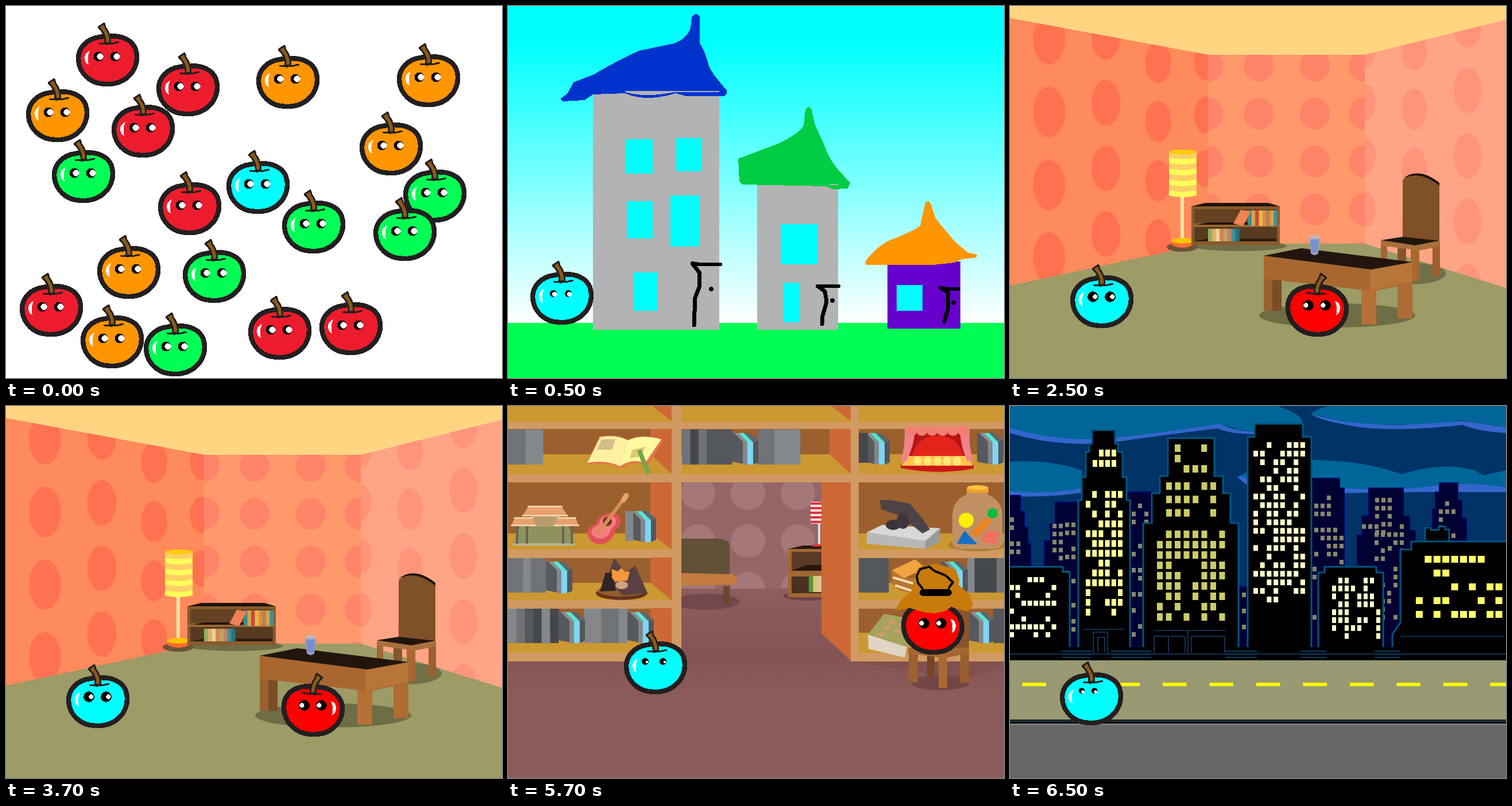
An HTML page that plays this animation: 864x648 px, repeating every 8 s.

```html
<!DOCTYPE html>
<html lang="en">
<head>
<meta charset="utf-8">
<title>Apples</title>
<style>
html, body { margin: 0; width: 100%; height: 100%; overflow: hidden; background: #fff; }
svg { display: block; width: 100%; height: 100%; }
</style>
</head>
<body>
<svg id="stage" viewBox="0 0 864 648"></svg>
<script>
const path = (d, fill, stroke = 'none', w = 0) =>
  `<path d="${d}" fill="${fill}" stroke="${stroke}" stroke-width="${w}" stroke-linejoin="round" stroke-linecap="round"/>`;
const line = (d, color, w) => path(d, 'none', color, w);
const poly = (pts, fill) => `<polygon points="${pts}" fill="${fill}"/>`;
const rect = (x, y, w, h, fill) => `<rect x="${x}" y="${y}" width="${w}" height="${h}" fill="${fill}"/>`;
const oval = (x, y, rx, ry, fill) => `<ellipse cx="${x}" cy="${y}" rx="${rx}" ry="${ry}" fill="${fill}"/>`;
const each = (list, f) => list.map(f).join('');
const times = (n, f) => each([...Array(n).keys()], f);
const strips = (x, y, w, h, colors) => each(colors, (c, i) => rect(x + i * w, y, w + .3, h, c));
const fade = (id, ...stops) => `<defs><linearGradient id="${id}" x2="0" y2="1">` +
  each(stops, ([at, c]) => `<stop offset="${at}" stop-color="${c}"/>`) + '</linearGradient></defs>';
function random(seed) {
  let s = seed * 7919;
  return () => (s = s * 16807 % 2147483647) / 2147483647;
}

const INK = '#231f20', CYAN = '#00ffff', GREEN = '#00ff55', ORANGE = '#ff9500', RED = '#ed1c2c';

// eyes, relative to the body centre
const WIDE = { l: -16, r: 13, y: -6, size: 8.5, dx: 3, dy: 0, white: 5.7 };
const LOOK = { l: -15.5, r: 14.5, y: -8.5, size: 9.3, dx: 4, dy: 0, white: 4.2 };
function apple(x, y, color, eyes = WIDE, flip = 1, stem = true) {
  const body = path('M-51 -4C-50 -22 -36 -37 -14 -40Q2 -43 18 -41C40 -37 51 -24 51 -5C51 14 40 30 22 38Q12 42 0 42Q-14 42 -24 38C-42 29 -51 14 -51 -4Z', color, INK, 8.5);
  const shine = path('M-31 -16Q-40 -13 -40 -3Q-39 6 -33 8Q-37 -4 -31 -16Z', '#fff');
  const twig = stem ? line('M-14 -29Q2 -26 19 -31', INK, 3) +
    path('M-16 -57L-6 -64L-4 -57Q5 -45 5 -30L-4 -30Q-3 -45 -16 -57Z', '#8b5a17', INK, 3) : '';
  const face = each([eyes.l, eyes.r], e => oval(e, eyes.y, eyes.size, eyes.size, '#000') +
    oval(e + eyes.dx * flip, eyes.y + eyes.dy, eyes.white, eyes.white, '#fff'));
  return `<g transform="translate(${x} ${y})" shape-rendering="crispEdges"><g transform="scale(${flip} 1)">${body}${shine}${twig}</g>${face}</g>`;
}

function crowd() {
  const groups = [
    [RED, [[177, 94], [317, 146], [239, 218], [320, 353], [79, 530], [477, 570], [601, 562]]],
    [ORANGE, [[90, 191], [491, 133], [736, 130], [671, 249], [214, 464], [185, 585]]],
    [GREEN, [[135, 297], [747, 331], [695, 398], [536, 385], [363, 471], [295, 599]]],
    [CYAN, [[439, 316]]]
  ];
  return rect(0, 0, 864, 648, '#fff') + each(groups, ([c, at]) => each(at, ([x, y]) => apple(x, y, c)));
}

function street() {
  const GREY = '#b3b3b3', BLUE = '#0033cc', LEAF = '#00cc44';
  const pane = (...box) => rect(...box, CYAN);
  const door = (top, side, x, y) => line(top, '#000', 6.5) + line(side, '#000', 7) + oval(x, y, 4, 4, '#000');
  return fade('sky', [.12, CYAN], [1, '#fff']) + '<g shape-rendering="crispEdges">' +
    rect(0, 0, 864, 553, 'url(#sky)') + rect(0, 552, 864, 96, GREEN) +
    rect(148, 146, 220, 418, GREY) + rect(434, 300, 141, 264, GREY) + rect(661, 445, 127, 117, '#6600cc') +
    pane(204, 232, 48, 60) + pane(293, 230, 45, 58) + pane(207, 340, 45, 65) + pane(283, 330, 50, 89) +
    pane(219, 464, 41, 67) + pane(475, 380, 65, 70) + pane(479, 482, 28, 69) + pane(677, 486, 45, 45) +
    path('M91 162L104 152L114 133L150 119Q190 95 228 78L290 65Q312 56 318 38L320 20Q327 9 334 19L334 65Q344 80 350 105Q354 116 381 147L381 153L376 157L310 157L292 152Q240 168 204 152L148 154L133 164L96 166Z', BLUE) +
    path('M204 148H368V150H308L290 150Q240 160 204 150Z', GREY) +
    path('M401 266L470 240Q508 222 515 208L518 181Q524 171 529 181L534 205L552 245Q560 268 575 285L596 308L592 318L565 319L555 314L408 311L403 306Z', LEAF) +
    line('M561 311H573', GREY, 2) +
    path('M622 446Q640 420 665 408Q705 393 718 383L727 343Q731 337 736 343L745 370Q765 395 780 412L802 430L817 433L816 438L790 441L778 447L740 451L624 451Z', ORANGE) +
    door('M321 448L332 450H370', 'M322 450L334 465L333 490L326 508L324 556', 354, 493) +
    door('M539 488H576', 'M541 489L552 497L555 515L548 540L547 554', 565, 513) +
    door('M753 491L766 493H785', 'M755 492L766 498L767 525L760 550', 776, 517) + '</g>' +
    apple(94, 509, CYAN, { l: -15, r: 11, y: -8, size: 6, dx: 2, dy: 1, white: 4 });
}

// wallpaper: each column starts at [x, y]; scale(x) gives its perspective
function dots(id, clip, color, rx, ry, step, scale, cols) {
  return `<clipPath id="${id}"><polygon points="${clip}"/></clipPath><g clip-path="url(#${id})">` +
    each(cols, ([x, y]) => {
      const s = scale(x);
      return times(5, i => oval(x, y + i * step * s, rx * s, ry * s, color));
    }) + '</g>';
}

function room() {
  const left = '0,21 345,85 345,413 0,487', back = '345,85 618,85 618,414 345,414', right = '618,85 864,24 864,491 618,414';
  return rect(0, 0, 864, 648, '#9d9b66') + rect(0, 0, 864, 90, '#ffd582') +
    poly(left, '#ff8a5b') + poly(back, '#ff996b') + poly(right, '#ffa485') +
    dots('wl', left, '#ff7251', 28, 44, 126.7, x => 1 - (x - 68) * .00098, [[68, 58], [167, 54], [258, 98], [341, 97]]) +
    dots('wb', back, '#ff8468', 26, 28, 83.5, () => 1, [346, 433, 531, 616].map(x => [x, 104])) +
    dots('wr', right, '#ff947b', 27, 44, 126.7, x => .735 + (x - 617) * .00092, [[617, 75], [704, 76], [797, 33]]) +
    oval(400, 418, 82, 9, '#6f6c47') + oval(300, 420, 27, 8, '#6f5437') +
    // lamp
    rect(297, 330, 6, 80, '#ffe6a0') + path('M281 409V416Q300 426 320 416V409Z', '#ff6a32') + oval(300.5, 409, 19.5, 5, '#ffc400') +
    path('M277 254V329Q301 337 325 329V254Z', '#ffcf63') +
    times(4, i => path(`M277 ${264 + i * 19}q24 6 48 0v9q-24 6 -48 0Z`, '#ffff58')) + oval(301, 254, 24, 4, '#ffcb00') +
    // bookcase
    rect(316, 349, 154, 67, '#8a5a2b') + rect(321, 354, 144, 24, '#654221') + rect(321, 383, 144, 27, '#573b20') +
    poly('316,349 340,343 450,343 470,349', '#1e140d') + poly('321,382 345,377 464,377 464,382', '#21150b') +
    poly('321,410 345,405 464,405 464,410', '#2b1c0e') + rect(316, 381, 154, 4, '#9a6632') +
    strips(414, 356, 6.5, 27, ['#398c88', '#d4a252', '#c94934', '#e4bb42', '#da8b4c', '#bd814b', '#d5a34b', '#438d94']) +
    poly('389,379 402,355 420,358 406,383', '#ee8255') +
    strips(345, 388, 6.8, 22, ['#8fae60', '#dfb067', '#f0d0a0', '#d38850', '#c6a067', '#b9856b', '#438f94', '#23747c']) +
    // chair
    oval(700, 466, 59, 19, '#727047') +
    path('M684 303Q712 279 748 310V410H684Z', '#805028') + path('M684 301Q711 279 748 308V313Q714 285 684 301Z', '#1d120b') +
    rect(646, 412, 11, 60, '#a26632') + rect(675, 418, 15, 35, '#85562b') + rect(698, 418, 15, 61, '#a8682f') + rect(736, 411, 13, 60, '#9c602d') +
    poly('646,408 706,417 748,409 748,419 712,426 646,417', '#a9713a') + poly('646,408 684,402 748,409 706,417', '#21160d') +
    // table
    oval(570, 539, 136, 21, '#6e6d45') +
    rect(442, 468, 15, 62, '#9a602d') + rect(457, 472, 16, 59, '#7c4c24') + rect(675, 475, 26, 69, '#ad6c33') + rect(612, 485, 26, 70, '#b57035') +
    poly('442,435 632,459 701,446 701,482 634,497 442,475', '#a9672f') + poly('627,459 701,446 701,480 627,497', '#b77538') +
    poly('442,435 507,422 701,446 629,459', '#21150d') +
    path('M521 402L524 431Q531 437 537 431L540 402Z', '#a7a6b9') + path('M523 407L525 429Q531 433 536 429L538 407Z', '#7590d1') + oval(530.5, 402, 9.5, 3, '#c6b8bc') +
    apple(160, 515, CYAN, LOOK) + apple(535, 530, '#ff0000', LOOK, -1);
}

function books(x, y, w, h) {
  const next = random(x + y + 3);
  const greys = ['#85888a', '#54575b', '#707376', '#44474c'];
  return strips(x, y, w / Math.round(w / 14), h,
    Array.from({ length: Math.round(w / 14) }, () => greys[Math.floor(next() * 4)]));
}
// a few books seen from the corner, with one bright spine
const pair = (x, y, h) => `<g transform="translate(${x} ${y})">` +
  poly(`0,0 14,0 26,16 26,${h} 0,${h - 5}`, '#56595d') + poly('4,0 12,0 27,16 20,16', '#8c8f91') +
  poly('12,0 21,0 37,16 27,16', '#55e6d6') + poly('21,0 31,0 46,13 37,16', '#626569') +
  rect(19, 16, 8, h - 16, '#83878a') + rect(27, 16, 10, h - 16, '#7fd5f5') + poly(`37,16 46,13 46,${h - 4} 37,${h}`, '#54575a') + '</g>';

const BOARD = '#d09a62', SHELF = '#cb9831', PANEL = '#cd6835';
function bay(x, w, rows, side) {
  return rect(x, 0, w, rows.at(-1)[2], '#9b602e') + rect(x, 0, w, 28, SHELF) + rect(x, 28, w, 12, BOARD) +
    (side ? poly(`${x + w - 34},0 ${x + w},0 ${x + w},26`, PANEL) : '') +
    each(rows, ([top, mid, low]) => rect(x, mid, w, low - mid, SHELF) +
      (side ? poly(`${x + w - 37},${top} ${x + w},${top} ${x + w},${low} ${x + w - 37},${mid}`, PANEL) : '') + rect(x, low, w, 15, BOARD));
}

function library() {
  const opening = '302,133 546,133 546,318 302,318';
  const rows = [[40, 84, 118], [133, 222, 250], [264, 308, 338], [352, 395, 430]];
  const roof = (x, y, r, h) => poly(`${x - r * .75},${y} ${x + r * .75},${y} ${x + r},${y + h} ${x - r},${y + h}`, '#e9a06c') +
    line(`M${x - r} ${y + h}h${2 * r}M${x - r * .75} ${y}h${1.5 * r}`, '#f4ddb1', 2.5);
  return fade('floor', [0, '#8e5e5e'], [.35, '#845455'], [.6, '#8c5c5b']) +
    rect(0, 317, 864, 331, 'url(#floor)') + poly(opening, '#956668') +
    dots('wo', opening, '#a47779', 30, 29, 83, () => 1, [331, 418, 505].map(x => [x, 152])) +
    path('M864 445Q845 466 790 475L600 445Z', '#81514f') +
    // back room
    oval(345, 341, 58, 14, '#73484c') + oval(525, 331, 46, 8, '#70454a') +
    path('M302 231H360Q386 231 386 243V294H302Z', '#625039') + path('M302 291L390 293Q399 296 398 311L302 313Z', '#c47b40') + rect(375, 314, 11, 32, '#6b482b') +
    rect(488, 248, 58, 85, '#a36634') + rect(494, 254, 52, 33, '#5d3a24') + rect(494, 297, 52, 29, '#493020') + poly('488,249 514,243 546,243 546,249', '#28190f') + poly('494,287 520,277 546,277 546,287', '#25160e') +
    strips(524, 296, 7.5, 28, ['#56943c', '#e2c373', '#d8c59a']) +
    rect(540, 200, 4, 43, '#eadbdb') + rect(531, 241, 15, 4, '#db322d') + rect(527, 167, 19, 38, '#f4e7e2') + times(5, i => rect(527, 168 + i * 8, 19, 4, '#e32f38')) +
    // shelves
    bay(0, 285, rows, true) + bay(611, 253, rows) + bay(302, 295, rows.slice(0, 1), true) +
    poly('546,133 599,133 599,445 546,396', PANEL) + rect(285, 0, 17, 445, BOARD) + rect(597, 0, 14, 445, BOARD) +
    each([[0, 61], [303, 87], [434, 75]], ([x, w]) => books(x, 41, w, 61)) + each([390, 619, 817], x => pair(x, 47, 55)) + books(611, 47, 16, 52) +
    pair(212, 183, 54) + books(204, 183, 14, 52) +
    each([[0, 66], [611, 52], [800, 64]], ([x, w]) => books(x, 265, w, 60)) + each([66, 755], x => pair(x, 271, 55)) +
    each([[0, 88], [132, 76], [845, 19]], ([x, w]) => books(x, 353, w, 60)) + each([88, 208, 801], x => pair(x, 359, 54)) +
    // open book and pencil
    path('M136 103L159 53Q190 48 209 59Q232 47 270 59L245 103Q215 94 197 109Q170 96 136 103Z', '#e6754e') +
    path('M138 99L161 54Q190 49 209 60L195 105Q170 93 138 99Z', '#fff0a1') + path('M195 105L209 60Q231 48 267 58L239 99Q215 91 195 105Z', '#fffaa0') +
    poly('163,58 187,58 181,76 155,76', '#d2bd8b') + poly('217,76 239,71 232,88 212,91', '#ddc875') + poly('225,78 232,75 248,116 241,120', '#72a64c') +
    // theatre
    path('M684 102H811V109Q748 121 684 108Z', '#cc1717') + rect(694, 40, 109, 56, '#b81414') + path('M703 89Q712 52 748 52Q786 52 793 89Z', '#e3241c') +
    poly('685,104 697,87 799,87 810,104', '#ffc34c') + times(5, i => oval(714 + i * 17, 96, 7, 8, '#ffe878')) +
    path('M691 40H709Q708 70 693 98L684 97Q692 72 691 40Z', '#f1828a') + path('M787 40H804Q802 72 811 96H800Q788 70 787 40Z', '#f1828a') +
    times(6, i => oval(703 + i * 18, 43, 10, 9, '#f27f72')) +
    // pavilion
    poly('8,240 22,207 105,207 117,240', '#8e925e') + rect(9, 239, 107, 4, '#b4b5a1') + each([14, 31, 94, 109], x => rect(x, 206, 4, 34, '#696450')) +
    rect(40, 192, 50, 18, '#b99c6e') + roof(64.5, 175, 39, 16) + roof(27, 195, 21, 13) + roof(102, 195, 21, 13) +
    // guitar
    path('M139 226Q135 210 153 206Q157 190 173 187Q194 183 196 199Q198 210 187 215Q184 235 164 241Q144 241 139 226Z', '#df5254') + path('M145 222Q145 211 158 207Q161 190 178 191Q191 193 187 207Q178 214 176 224Q158 239 145 222Z', '#f57c80') +
    oval(173, 201, 8, 8, '#713323') + line('M158 220L203 160', '#d39052', 6) + line('M201 164L206 156', '#e7a169', 9) +
    // volcano
    oval(198, 326, 45, 12, '#63351e') + oval(198, 322, 42, 10, '#965b28') + path('M172 300L185 265L205 290L222 278L243 326L199 330Z', '#5a4043') + path('M160 323L170 290L182 292L188 322Z', '#2f2428') +
    poly('181,284 191,288 198,282 204,289 212,288 208,304 186,306 181,299', '#f4983c') + oval(198, 312, 11, 7, '#d2a27d') +
    // sculpture
    poly('625,220 652,207 753,213 727,236', '#d8d8d7') + poly('625,220 727,235 727,249 625,240', '#b8b8b8') + poly('727,235 753,213 753,236 727,250', '#999') +
    path('M648 164L668 164L700 170L722 196L735 215L722 222L702 206L690 204L680 190L650 180Z', '#4c4347') + oval(671, 207, 13, 9, '#3b3338') + oval(688, 200, 11, 14, '#40373c') +
    // jar
    oval(817, 242, 50, 11, '#a87e31') + path('M799 148H836L835 154Q861 165 861 190V238Q861 249 843 249H790Q774 248 774 238V190Q775 164 799 154Z', '#c19164') + path('M799 142Q818 135 837 142V151H799Z', '#f0a224') + oval(818, 142, 18, 4, '#ffc143') +
    oval(798, 199, 13, 13, '#fff000') + oval(844, 187, 9, 9, '#00bf37') + line('M815 221L835 201', '#ef821e', 12) + poly('782,240 795,217 818,241', '#176fc1') + poly('827,224 838,217 855,220 850,241 828,238', '#f46f60') +
    // loose books
    poly('669,286 694,300 709,300 708,327 682,321 668,310', '#b77636') + line('M672 299L705 309M676 313L701 321', '#f5dfaa', 4) + poly('669,286 709,267 727,282 690,300', '#f1a440') +
    poly('627,398 695,420 691,438 628,423', '#dfd5c5') + poly('627,398 655,362 710,372 695,420', '#a6a35d') + times(5, i => oval(650 + i * 9, 398 - i * 11 % 27, 6, 4, '#cf9970')) +
    // chair and figures
    oval(753, 482, 51, 13, '#714644') + rect(779, 355, 24, 74, '#8b552b') + rect(730, 434, 13, 39, '#744523') + rect(698, 429, 16, 53, '#9d6130') + rect(788, 430, 15, 52, '#9a5d2d') +
    poly('697,421 803,421 803,431 760,439 697,431', '#a46732') + rect(750, 433, 15, 58, '#ab6a32') +
    apple(740, 387, '#ff0000', LOOK, -1, false) + '<g shape-rendering="crispEdges">' +
    path('M674 356L688 334L704 322Q707 290 717 280L745 275L776 283Q790 300 785 312L804 328L811 348L800 358L772 350Q755 365 724 359L700 352Z', '#c87b0a') +
    line('M722 318L714 308L712 296L718 284L734 280L742 287L762 295L775 307L768 317', '#000', 4) + line('M723 325H767', '#000', 12) + '</g>' +
    apple(257, 456, CYAN, { l: -18, r: 13, y: -11, size: 6, dx: 3, dy: 1, white: 2.3 });
}

function panes(x, y, cols, rows, dx, dy, w, h, color, lit = .55) {
  const next = random(x + y + cols);
  return times(rows, r => times(cols, c => next() < lit ? rect(x + c * dx, y + r * dy, w, h, color) : ''));
}

function city() {
  const far = d => path(d, '#000033', '#000070', 2), near = d => path(d, '#000', '#005580', 3);
  const cloud = d => path(d, '#006699'), rim = d => path(d, '#3366cc');
  const dim = (x, y, cols, rows) => panes(x, y, cols, rows, 11, 14, 7, 8, '#86866e');
  const dash = x => rect(x, 482, 41.5, 6, '#ffff00');
  return rect(0, 0, 864, 648, '#003366') +
    rim('M0 37L175 55L365 30Q400 50 450 42V48Q390 52 362 39Q270 50 175 64Q80 72 0 47Z') +
    cloud('M0 0H465Q505 12 510 28Q450 50 400 42L365 31Q280 45 175 56Q90 64 0 38Z') +
    rim('M524 14Q590 33 680 33L790 26L864 37V47Q820 45 788 33Q680 45 610 37Q540 26 524 14Z') + cloud('M524 14Q540 0 566 0H864V37L788 25Q690 36 620 31Q560 24 524 14Z') +
    rim('M0 146Q70 152 125 142V151Q65 160 0 157Z') + cloud('M0 97Q70 93 125 112V143Q65 155 0 148Z') +
    rim('M396 124L420 112L864 138V150H700L570 152L414 139Z') + cloud('M400 122Q425 110 525 94Q620 95 682 119Q755 96 810 112L824 121L864 112V142Q800 130 705 143Q570 152 400 122Z') +
    far('M0 156H18V184H25V211H31V240H36V290H0Z') + far('M48 430V279H60V235H70V205H79V168H125V430Z') + far('M205 430V150H248V430Z') + far('M397 430V315H416V430Z') +
    far('M522 430V126H574V143H582V430Z') + far('M594 430V280H605V225H613V192H625V143H685V192H696V217H706V430Z') + far('M728 250V210H736V179H741V150H748V134H780V165H787V196H795V250Z') +
    dim(0, 194, 2, 6) + dim(96, 189, 2, 16) + dim(74, 205, 2, 5) + dim(212, 170, 3, 17) + dim(404, 325, 1, 6) +
    dim(530, 156, 5, 9) + dim(527, 280, 1, 7) + dim(636, 160, 3, 7) + dim(613, 206, 7, 5) + dim(646, 280, 3, 7) + dim(747, 166, 3, 5) +
    near('M119 430V164H125V124H132V80H138V66H143V42H183V66H188V80H196V124H203V164H209V430Z') +
    near('M232 430V204H247V152H261V122H275V56H356V122H371V152H384V204H398V430Z') +
    near('M414 430V54H426V31H510V54H525V430Z') + near('M-3 430V280H92V289H104V430Z') + near('M537 430V290H548V280H638V290H650V430Z') +
    near('M723 240V212H733V216H747V210H758V215H765V240Z') + near('M666 430V398L680 377V250H699V236H867V430Z') +
    panes(144, 76, 4, 2, 11, 18, 8, 12, '#ffff99') + panes(132, 148, 6, 13, 11.2, 17.1, 8, 12, '#ffff99') +
    panes(287, 67, 4, 3, 15.4, 18, 10, 13, '#cccc66') + panes(272, 133, 6, 3, 15.4, 23.3, 10, 13, '#cccc66') +
    panes(256, 217, 8, 9, 15.5, 18, 10, 13, '#cccc66', .75) + panes(424, 63, 8, 19, 11.7, 14.95, 8, 10, '#ffffcc') +
    panes(-1, 298, 8, 8, 10.5, 13.7, 8, 9, '#ffffcc', .42) + panes(561, 299, 8, 8, 11, 13.8, 7, 10, '#ffffcc', .5) +
    panes(707, 261, 10, 5, 15.4, 24, 12, 12, '#ffff66', .5) +
    // street level
    rect(0, 420, 864, 24, '#000') + line('M128 389H199M251 391H375M681 401H859', '#0d2b4c', 2) +
    line('M145 430V394H170V430M153 428V403H165V428M251 430V401H276V430M280 401H305V430M310 392V430M316 430V401H374V430', '#152f55', 2) +
    line('M0 432H864', '#12304e', 2) + each([[90, 51], [176, 70], [375, 55], [506, 45], [635, 45]], ([x, w]) => times(3, i => rect(x, 426 + i * 5.5, w, 2, '#083e62'))) +
    rect(0, 443, 864, 105, '#999973') + times(11, i => dash(21.5 + i * 81.5)) +
    rect(0, 546, 864, 7, '#1c2931') + rect(0, 551, 864, 2, '#000') + rect(0, 553, 864, 3, '#7d7d7d') + rect(0, 556, 864, 92, '#666') +
    apple(142, 510, CYAN, { l: -17, r: 5, y: -14, size: 5, dx: 2, dy: 2, white: 2.8 });
}

const LOOP = 8000;
const scenes = [[0, crowd], [500, street], [2500, room], [4500, library], [6500, city]];
const stage = document.getElementById('stage');
stage.innerHTML = each(scenes, ([, draw]) => `<g display="none">${draw()}</g>`);
const layers = [...stage.children];
const origin = performance.now();

function render(t) {
  const current = scenes.filter(([at]) => at <= t).length - 1;
  layers.forEach((g, i) => g.setAttribute('display', i === current ? 'inline' : 'none'));
}
function tick() {
  render((performance.now() - origin) % LOOP);
  requestAnimationFrame(tick);
}
tick();
</script>
</body>
</html>
```
